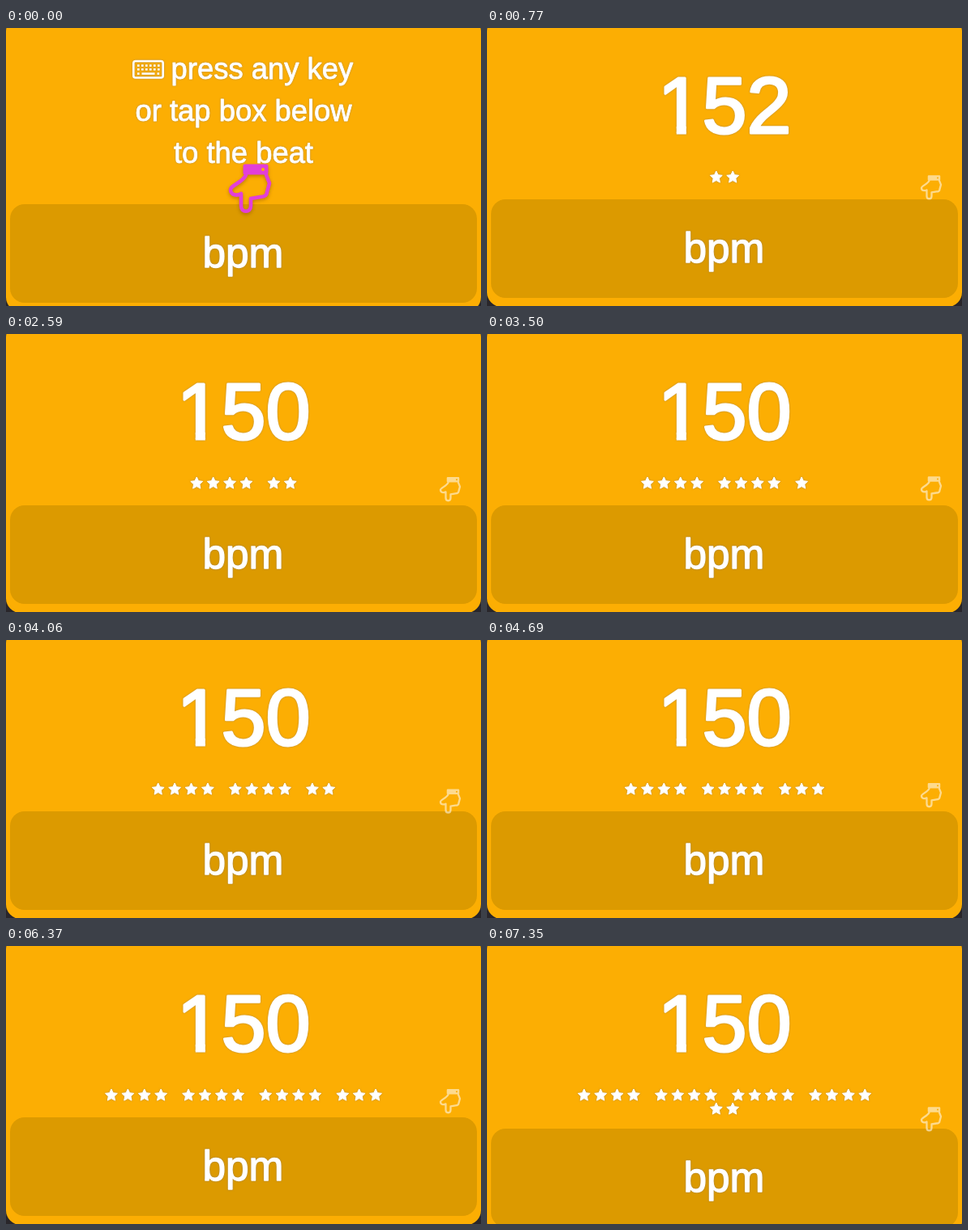
Animation, 586 px wide and 344 px high, one loop 7.42 s. Source, as an HTML page:

```html
<!DOCTYPE html>
<html lang="en">
<head>
<meta charset="utf-8">
<title>Tap tempo</title>
<style>
  html, body { margin: 0; width: 100%; height: 100%; overflow: hidden; background: #29262a; }
  svg { display: block; width: 586px; height: 344px; }
  text { font-family: "Liberation Sans", Arial, sans-serif; fill: #fff; stroke: #fff; stroke-linejoin: round; }
  .white { fill: #fff; filter: drop-shadow(0 0 .8px rgba(110, 115, 160, .5)); }
  .prompt text { font-size: 36.4px; stroke-width: .8px; }
  .mid { text-anchor: middle; }
  #bpm { font-size: 51.4px; stroke-width: 1.3px; }
  #count { font-size: 99px; stroke-width: 3px; }
  #big { color: #e23fd9; filter: drop-shadow(0 2px 2px rgba(120, 70, 0, .45)); }
  #small { color: #fff; opacity: .55; }
</style>
</head>
<body>
<svg viewBox="0 0 586 344">
  <defs>
    <polygon id="star" stroke="#fff" stroke-width="1" stroke-linejoin="round"/>
    <g id="hand" fill="none" stroke="currentColor" stroke-linejoin="round" stroke-linecap="round">
      <path stroke-width="4.6" d="M296 182C292 191 277 195 277 200C277 207 285 208 290 205V220C290 229 302 229 302 220V211L314 209C320 209 322 206 322 203L325 192L321 182"/>
      <rect x="294" y="170" width="28" height="10" rx="1" stroke-width="3" fill="currentColor"/>
      <circle cx="317" cy="175" r="2" fill="#fbae03" stroke="none"/>
    </g>
    <!-- trims the foot of the digit 1 -->
    <clipPath id="trim">
      <path d="M200 40H390V140H264V120.5H245.8V140H233.8V120.5H200Z"/>
    </clipPath>
  </defs>

  <rect id="card" y="-14" width="586" rx="18" fill="#fcae03"/>
  <rect id="box" x="5" width="576" height="122" rx="18" fill="#dc9a00"/>

  <g id="intro">
    <g class="white prompt">
      <rect x="157.3" y="41" width="36.4" height="20.5" rx="2.5" fill="none" stroke="#fff" stroke-width="2.6"/>
      <path fill="none" stroke="#fff" stroke-width="2.6" d="M162 46.5H190M162 51.3H190" stroke-dasharray="2.6 2.4"/>
      <path stroke="#fff" stroke-width="2.6" d="M162 56.5h2.6M167.5 56.5h16M186.5 56.5h2.6"/>
      <text x="203.6" y="63">press any key</text>
      <text class="mid" x="293" y="115">or tap box below</text>
      <text class="mid" x="293" y="167">to the beat</text>
    </g>
    <g id="big"><use href="#hand"/></g>
  </g>

  <g id="tempo">
    <g class="white"><text id="count" x="210.4" y="129.5" clip-path="url(#trim)">150</text></g>
    <g id="stars" class="white"></g>
    <g id="small"><use href="#hand"/></g>
  </g>

  <g class="white"><text id="bpm" class="mid" x="292.4">bpm</text></g>
</svg>
<script>
  const LOOP = 7420, STEP = 70, FIRST_TAP = 2, BEAT = 6;
  const PER_ROW = 16, PITCH = 20.4, GAP = 13.5, MAX_TAPS = 18;
  const $ = id => document.getElementById(id);
  const move = (el, x, y, s = 1) => el.setAttribute("transform", `translate(${x} ${y}) scale(${s})`);

  $("star").setAttribute("points", Array.from({ length: 10 }, (_, i) => {
    const r = i % 2 ? 3.8 : 7.8, a = (i / 5 - .5) * Math.PI;
    return `${(r * Math.cos(a)).toFixed(2)},${(r * Math.sin(a)).toFixed(2)}`;
  }).join(" "));

  const stars = Array.from({ length: MAX_TAPS }, () => {
    const use = document.createElementNS("http://www.w3.org/2000/svg", "use");
    use.setAttribute("href", "#star");
    return $("stars").appendChild(use);
  });

  const offset = j => j * PITCH + Math.floor(j / 4) * GAP;

  function placeStars(taps) {
    stars.forEach((star, i) => {
      star.style.display = i < taps ? "" : "none";
      const row = Math.floor(i / PER_ROW), left = taps - row * PER_ROW;
      const size = Math.min(left, PER_ROW);
      // a finished group at the end keeps its trailing gap
      const tail = left <= PER_ROW && size % 4 === 0 ? GAP : 0;
      const start = 293 - (offset(size - 1) + tail) / 2;
      move(star, start + offset(i % PER_ROW), 184.8 + row * 17);
    });
  }

  function render(time) {
    const tick = Math.floor((time % LOOP) / STEP) - FIRST_TAP;
    const taps = Math.max(0, Math.floor(tick / BEAT) + 1);
    const phase = tick < 0 ? 0 : tick % BEAT;
    const dip = phase ? 4.5 + 4.5 * Math.cos((phase - 1) / 5 * Math.PI) : 0;
    const counting = taps > 1;
    const top = !counting ? 218 : taps > PER_ROW ? 226 : 212;

    $("intro").style.display = counting ? "none" : "";
    $("tempo").style.display = counting ? "" : "none";
    $("box").setAttribute("y", top);
    $("card").setAttribute("height", top + 147);
    $("bpm").setAttribute("y", top + 78.2);
    $("count").textContent = taps === 2 ? "152" : "150";
    move($("big"), 0, dip);
    move($("small"), 397.5, top - 120 + dip, .5);
    placeStars(taps);
  }

  const begin = performance.now();
  (function loop() {
    render(performance.now() - begin);
    requestAnimationFrame(loop);
  })();
</script>
</body>
</html>
```
